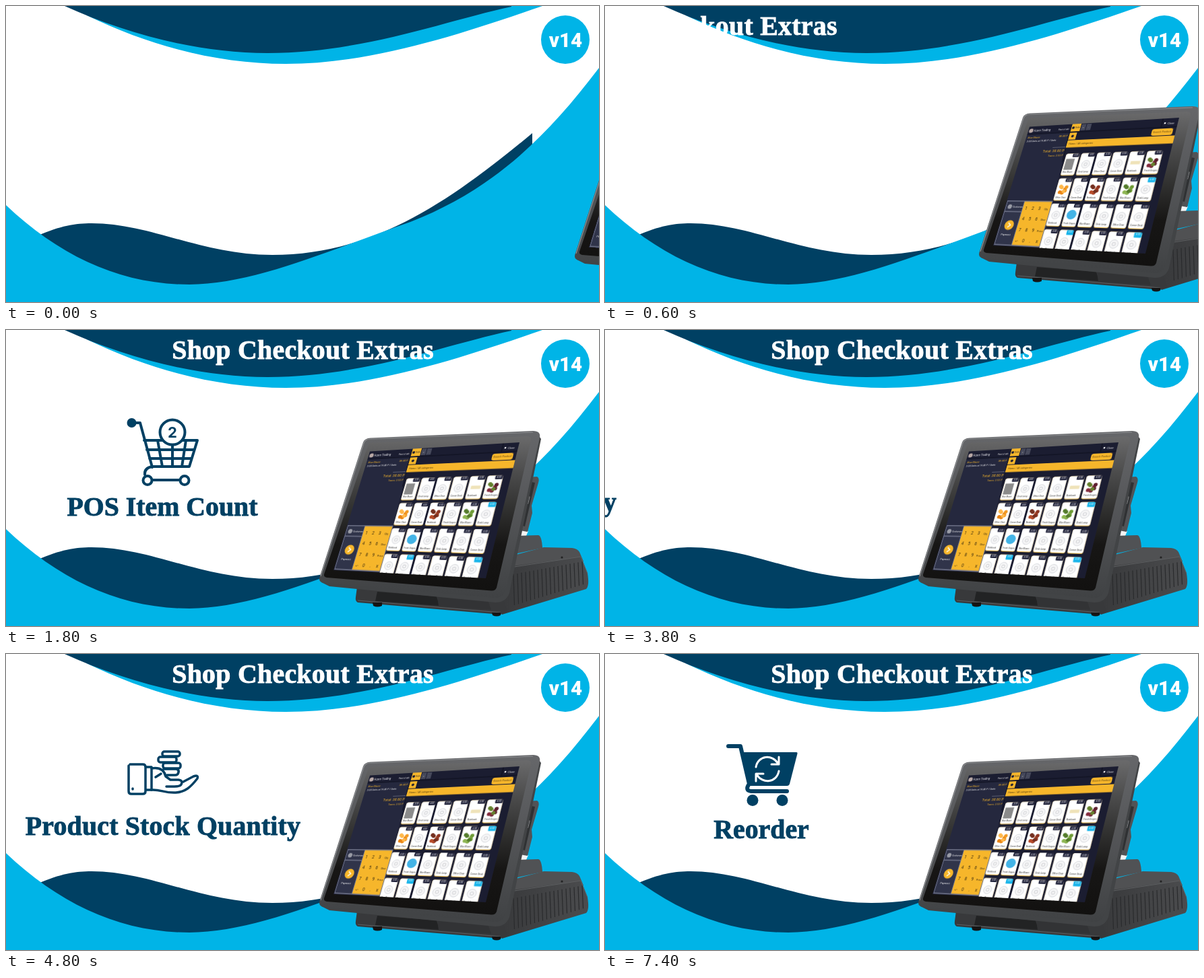
An HTML page for the animation above (8000 ms loop, 880x440 px).

```html
<!DOCTYPE html>
<html lang="en">
<head>
<meta charset="utf-8">
<title>Checkout features</title>
<style>
  html, body { margin: 0; width: 100%; height: 100%; overflow: hidden; background: #fff; }
  #stage { position: relative; width: 880px; height: 440px; overflow: hidden; background: #fff; }
  #stage svg, #till { position: absolute; left: 0; top: 0; }
  #till { width: 880px; height: 440px; }
  #screen { transform-origin: 0 0; }
  .head { font: bold 39.8px "Liberation Serif", "Times New Roman", serif; text-anchor: middle; stroke-width: .9px; }
  .navy { fill: #004063; stroke: #004063; }
  .line { fill: none; stroke: #004063; stroke-width: 4; stroke-linecap: round; stroke-linejoin: round; }
  .ui { font-family: Roboto, Arial, sans-serif; }
</style>
</head>
<body>
<div id="stage">
  <svg width="880" height="440" viewBox="0 0 880 440">
    <path fill="#00b4e7" d="M120 14C215 60 315 86 415 86C545 86 680 40 796 0H120Z"/>
    <path fill="#004063" d="M87 0C180 42 285 70 388 70C530 70 655 21 750 1V0Z"/>
    <path fill="#004063" d="M48 341C80 327 103 323 127 323C215 323 290 370 395 370C540 370 650 298 781 189V440H48Z"/>
    <path fill="#00b4e7" d="M0 296C80 372 170 414 272 414C368 414 480 363 600 321C720 274 799 199 880 92V440H0Z"/>
    <circle cx="830" cy="50" r="36" fill="#00b4e7"/>
    <text x="830.5" y="61" class="ui" font-size="29.5" font-weight="800" fill="#fff" text-anchor="middle">v14</text>
    <text id="title" class="head" x="440.5" y="43" fill="#fff" stroke="#fff" letter-spacing=".3">Shop Checkout Extras</text>
  </svg>

  <div id="till">
    <svg width="880" height="440" viewBox="0 0 880 440">
      <defs>
        <linearGradient id="rim" x1="0" y1="0" x2="0" y2="1">
          <stop offset="0" stop-color="#66676a"/><stop offset="1" stop-color="#404244"/>
        </linearGradient>
        <linearGradient id="glass" x1="0" y1="0" x2="0" y2="1">
          <stop offset="0" stop-color="#6a6a6b"/><stop offset=".25" stop-color="#4a4a4a"/>
          <stop offset=".7" stop-color="#171615"/><stop offset="1" stop-color="#121110"/>
        </linearGradient>
        <linearGradient id="side" x1="0" y1="0" x2="1" y2="0">
          <stop offset="0" stop-color="#37383a"/><stop offset="1" stop-color="#4b4c4e"/>
        </linearGradient>
      </defs>
      <path fill="#f4f4f4" d="M757 296L775 299L772 306L755 306Z"/>
      <path fill="#505255" d="M757 306L790 305Q795 306 796 324L750 334Z"/>
      <path fill="#515356" d="M772 219L788 218Q792 220 790 227L780 261L781 272L774 300L757 297Z"/>
      <path fill="#2f3133" d="M780 226L785 227L770 292L763 290Z"/>
      <rect x="769" y="247" width="7" height="10" fill="none" stroke="#85878a" transform="rotate(14 772 252)"/>
      <path fill="#505153" d="M742 338L798 323L840 324Q848 325 851 330L857 344L748 354Z"/>
      <path fill="url(#side)" d="M744 352L853 337L863 362Q866 380 861 385L736 423L728 398Z"/>
      <path fill="#38393b" d="M521 382L736 398L744 418L734 423L522 405Q518 403 519 397Z"/>
      <path fill="#222324" d="M551 389L639 396L643 410L548 403Z"/>
      <path fill="#323335" d="M640 394L714 399L720 416L642 411Z"/>
      <path fill="none" stroke="#5d5f61" d="M748 353L853 337L863 362M522 402L734 420"/>
      <path fill="#151515" d="M544 405h14v5q-7 3-13 0zM721 420h13v4q-6 3-12 0z"/>
      <g id="vents" stroke="#2a2b2d" stroke-width="1.2"></g>
      <circle cx="825" cy="338" r="1.6" fill="#222"/>
      <path fill="#424446" d="M790 156L794 162L747 391Q742 405 726 405L480 381L468 375Z"/>
      <path fill="url(#rim)" d="M530 167Q532 161 541 160.500L782 150Q794 150 792 160L742 386Q738 399 724 398L471 376Q463 374 465.500 367Z"/>
      <path fill="none" stroke="#8b8d90" stroke-width="1.200" d="M467 366L531 168Q533 162 541 162L782 152"/>
      <path fill="url(#glass)" d="M537 172Q538 168 543 167.500L773 158Q780 158 779 164L728 383Q726 388 720 387.500L476 368Q471 367 472 363Z"/>
    </svg>
    <svg id="screen" width="222" height="190" viewBox="0 0 222 190" class="ui"></svg>
  </div>

  <svg width="880" height="440" viewBox="0 0 880 440">
    <g id="count">
      <g class="line">
        <path d="M187 138H199L217 204M205 164H284L272 203H217Q205 205 206 215M209 178H279M213 191H275M225 164L232 203M247 166V203M267 164L261 203M218 223H257"/>
        <circle cx="247" cy="152" r="18.500" fill="#fff"/>
        <circle cx="210" cy="223.500" r="6.500" fill="#fff"/>
        <circle cx="265" cy="223.500" r="6.500" fill="#fff"/>
      </g>
      <circle cx="186.500" cy="138" r="7" fill="#004063"/>
      <text x="247" y="160" font-family="Inter, sans-serif" font-weight="700" font-size="22" text-anchor="middle" fill="#004063">2</text>
      <text class="head navy" x="232" y="276">POS Item Count</text>
    </g>
    <g id="stock">
      <g class="line" style="stroke-width:3.500">
        <path d="M184 164H203Q207 164 207 168V204Q207 208 203 208H186Q182 208 182 204V166M207 168H216V202H207M188 200V201"/>
        <path d="M216 170C229 168 235 173 237 182L244 187H256Q263 188 260 194Q258 197 250 197H238M261 191L278 182Q286 179 284 185C274 198 266 205 252 206C236 207 229 201 216 202M230 178L222 183"/>
        <rect x="232" y="145" width="26" height="7" rx="3"/>
        <rect x="226" y="153" width="27" height="8" rx="3"/>
        <rect x="233" y="162" width="26" height="8" rx="3"/>
        <path d="M234 171H253Q257 172 256 176Q255 180 251 180H239"/>
      </g>
      <text class="head navy" x="233" y="269" letter-spacing=".2">Product Stock Quantity</text>
    </g>
    <g id="again">
      <path class="line" style="stroke-width:6" d="M183 137H201L214 193Q207 203 217 204H270"/>
      <path fill="#004063" d="M203 146H284Q286 146 285.500 148L274 193Q273 196 270 196H214Z"/>
      <circle cx="219" cy="217.500" r="8.500" fill="#004063"/>
      <circle cx="263" cy="217.500" r="8.500" fill="#004063"/>
      <g fill="none" stroke="#fff" stroke-width="3" stroke-linecap="round" stroke-linejoin="round">
        <path d="M224 168C227 151 248 148 257 163M258 153V164H247"/>
        <path d="M224 168C227 151 248 148 257 163M258 153V164H247" transform="rotate(180 241 171)"/>
      </g>
      <text class="head navy" x="232" y="274">Reorder</text>
    </g>
  </svg>
</div>

<script>
const LOOP = 8000, OFF = -900;
const $ = id => document.getElementById(id);

function add(parent, tag, attrs, text) {
  const el = document.createElementNS("http://www.w3.org/2000/svg", tag);
  for (const k in attrs) el.setAttribute(k, attrs[k]);
  if (text) el.textContent = text;
  parent.append(el);
  return el;
}

// Steps are [time, x, y]; each pose is held until the next.
function play(id, steps) {
  const frames = steps.map(([t, x, y = 0]) => ({
    offset: t / LOOP, transform: `translate(${x}px, ${y}px)`, easing: "step-end"
  }));
  frames.push({ ...frames[frames.length - 1], offset: 1 });
  $(id).animate(frames, { duration: LOOP, iterations: Infinity });
}

// Perspective map from a w by h box to four corners, clockwise from top left.
function pin(el, w, h, [[x0, y0], [x1, y1], [x2, y2], [x3, y3]]) {
  const ax = x1 - x2, ay = y1 - y2, bx = x3 - x2, by = y3 - y2;
  const sx = x0 - x1 + x2 - x3, sy = y0 - y1 + y2 - y3;
  const den = ax * by - bx * ay;
  const g = (sx * by - bx * sy) / den, k = (ax * sy - sx * ay) / den;
  const m = [
    (x1 - x0 + g * x1) / w, (y1 - y0 + g * y1) / w, 0, g / w,
    (x3 - x0 + k * x3) / h, (y3 - y0 + k * y3) / h, 0, k / h,
    0, 0, 1, 0, x0, y0, 0, 1
  ];
  el.style.transform = `matrix3d(${m.map(n => n.toFixed(8))})`;
}

function drawScreen() {
  const s = $("screen"), gold = "#f6b62b", dark = "#1b1d31";
  const box = (x, y, width, height, fill, rx = 0) => add(s, "rect", { x, y, width, height, fill, rx });
  const dot = (cx, cy, r, fill) => add(s, "circle", { cx, cy, r, fill });
  const label = (x, y, size, fill, text, anchor = "start") =>
    add(s, "text", { x, y, "font-size": size, fill, "text-anchor": anchor }, text);

  box(0, 0, 222, 190, dark);
  add(s, "path", { d: "M0 13H69L78 190H0Z", fill: "#25283e" });
  add(s, "path", { d: "M0 13H222M69 13L71 60M201 0V13", stroke: "#0d0e1c", fill: "none" });

  dot(5, 7, 3.5, "#b9a9a6");
  label(9.500, 9, 4.500, "#e8e8ee", "Acorn Trading");
  label(50, 9, 3, "#fff", "Point of sale");
  box(70, 0, 14, 12, gold);
  dot(73, 6, 2, dark);
  label(76, 7.500, 3, dark, "Order");
  box(85, 1, 7, 10, "#45485a");
  box(93, 1, 7, 10, "#45485a");
  label(88.500, 8, 4, "#bbb", "+", "middle");
  label(96.500, 8, 4, "#bbb", "-", "middle");
  dot(205, 7, 1.2, "#fff");
  label(213, 9, 3.600, "#fff", "Close", "middle");

  box(70, 14, 11, 11, gold);
  dot(75.500, 19.500, 2, dark);
  box(190, 15, 28, 10, gold, 3);
  label(204, 21.500, 3.600, "#6b4a12", "Search Product", "middle");
  box(70, 26, 152, 11.500, gold);
  label(73, 33.500, 3.800, "#4a3510", "Home / All categories");

  label(3, 20, 4.200, gold, "Blue Blazer");
  label(3, 26, 3.900, "#fff", "2.00 Units at 19.40 P / Units");
  label(68, 20, 4.200, gold, "38.80 P", "end");
  box(49, 36, 20, .7, "#77798a");
  label(69, 44, 5.600, gold, "Total: 38.80 P", "end");
  label(69, 51, 4, gold, "Taxes: 2.53 P", "end");

  // keypad
  box(1, 120, 73, 69, "#70748a");
  box(2, 121.500, 27, 15, "#30344a");
  box(2, 138, 27, 49.500, "#30344a");
  dot(8, 129.500, 3.500, "#9a9ca6");
  label(13, 131, 3.700, "#fff", "Customer");
  dot(16, 158, 7.500, gold);
  add(s, "path", { d: "M14 154.500l4 3.500l-4 3.500", fill: "none", stroke: "#fff", "stroke-width": 1.6 });
  label(15, 174, 4, "#fff", "Payment", "middle");
  box(30, 121.500, 43, 66, gold);
  ["1 2 3 Qty", "4 5 6 Disc", "7 8 9 Price", "+/- 0 . x"].forEach((row, r) =>
    row.split(" ").forEach((key, c) =>
      label(35.500 + c * 10.600, 134 + r * 16.300, key.length < 3 ? 6.500 : 4, "#3a2c10", key, "middle")));

  // product cards
  const names = ["Blue Blazer", "Desk Lamp", "Office Chair", "Corner Desk", "Notebook", "Fresh Grapes"];
  const cluster = (x, y, fills) => {
    for (let i = 0; i < 9; i++)
      dot(x + 4.500 * Math.sin(i * 2.4), y + 5 * Math.cos(i * 1.7), 2.7, fills[i % fills.length]);
  };
  const goods = {
    "0,5": ["#5c1f2e", "#842d3e", "#64812d"],
    "1,0": ["#f29a23", "#e98313", "#ffb84a"],
    "1,2": ["#8e3522", "#b74c2a", "#743020"],
    "1,4": ["#6f9b36", "#8eb653", "#557d2c"]
  };
  const blue = ["1,5", "3,1", "3,5"];
  for (let r = 0; r < 4; r++) for (let c = 0; c < 6; c++) {
    const x = 74.200 + c * 23.400, y = 47.500 + r * 38.300, key = r + "," + c;
    const mx = x + 10.200, my = y + 17;
    box(x, y, 20.400, 34, "#e7b84d", 2.500);
    box(x, y, 20.400, 33, "#fff", 2.500);
    if (goods[key]) cluster(mx, my, goods[key]);
    else if (key === "0,0") box(x + 2, y + 8, 13, 17, "#8b8b8b");
    else if (key === "0,4") box(x + 4, y + 14, 13, 5, "#efe3b9");
    else if (key === "2,1") dot(mx, my - 1, 7, "#43b3e6");
    else {
      add(s, "circle", { cx: mx, cy: my, r: 5.800, fill: "#f7f7f8", stroke: "#cfd1d6", "stroke-width": .8 });
      add(s, "rect", { x: mx - 2, y: my - 2, width: 4, height: 4, rx: 1, fill: "none", stroke: "#b5b7bd", "stroke-width": .6 });
    }
    const tag = blue.includes(key);
    box(x + 10.400, y, 10, tag ? 7 : 5.500, tag ? "#17b4ea" : "#20223a", 1.2);
    label(x + 15.400, y + 4, 3, "#fff", "4.00", "middle");
    label(x + 2, y + 30, 3, "#333", names[(c + r * 2) % 6]);
  }
  pin(s, 222, 190, [[540, 180.500], [762, 167], [712, 369], [486, 357]]);
}

for (let i = 0; i < 18; i++) {
  const x = 753 + i * 6;
  add($("vents"), "line", { x1: x, y1: 363 - i * 1.1, x2: x + 1.500, y2: 409 - i * 1.8 });
}
drawScreen();

play("till", [[0, 379, 2], [200, 279, 1], [400, 179], [600, 90, -1], [800, 0]]);
play("title", [[0, OFF], [400, -390], [600, -290], [800, 0]]);
play("count", [[0, OFF], [1000, -360], [1200, -260], [1400, -160], [1600, -60], [1800, 0], [3800, OFF]]);
play("stock", [[0, OFF], [3800, -420], [4000, -319], [4200, -219], [4400, -119], [4600, -19], [4800, 0], [6800, OFF]]);
play("again", [[0, OFF], [6800, -290], [7000, -209], [7200, -99], [7400, 0]]);
</script>
</body>
</html>
```
